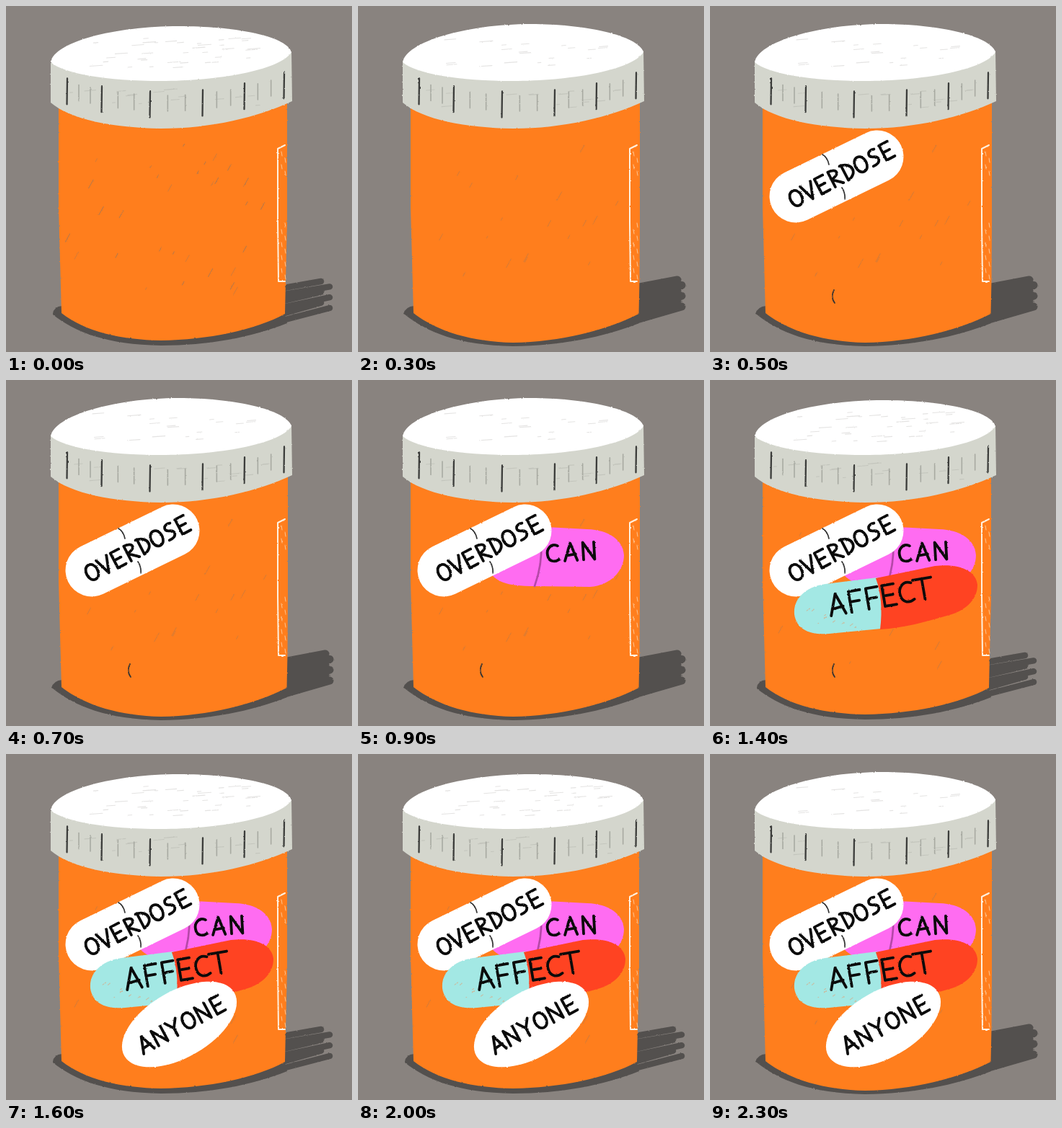
An HTML page for the animation above (2400 ms loop, 480 by 480 pixels).

```html
<!DOCTYPE html>
<html lang="en">
<head>
<meta charset="utf-8">
<title>Overdose can affect anyone</title>
<style>
html, body { margin: 0; width: 100%; height: 100%; overflow: hidden; background: #89837f; }
svg { display: block; width: 100vw; height: 100vh; }
path { stroke-linecap: round; stroke-linejoin: round; }
</style>
</head>
<body>
<svg viewBox="0 0 480 480" role="img" aria-label="Overdose can affect anyone">
  <defs id="defs"></defs>
  <g id="jars"></g>
  <g id="pills" filter="url(#chalk2)"></g>
</svg>
<script>
const $ = id => document.getElementById(id);

function random(seed) {
  return () => (seed = seed * 16807 % 2147483647) / 2147483647;
}

const line = (d, color, width, opacity = 1) =>
  `<path d="${d}" fill="none" stroke="${color}" stroke-width="${width}" opacity="${opacity}"/>`;
const shape = (d, color) => `<path d="${d}" fill="${color}"/>`;

// short parallel strokes (dx, dy) scattered over a box
function specks(rnd, count, [x, y, w, h], [dx, dy], color, opacity) {
  let d = '';
  for (let i = 0; i < count; i++) {
    const size = .3 + rnd();
    d += `M${x + rnd() * w} ${y + rnd() * h}l${dx * size} ${dy * size}`;
  }
  return line(d, color, 1.1, opacity);
}

// hand lettering: strokes around the middle of a box ten units high
const glyphs = {
  A: 'M-3.6 5L0 -5L3.6 5M-2.6 2L2.8 1.4',
  C: 'M3 -4C-1 -6 -3.5 -2 -3 1C-2.6 5 1 5.5 3.4 4',
  D: 'M-2.2 -5V5C5 4 5 -4 -3.2 -5',
  E: 'M3 -5H-2.6V5H3M-2.6 0H2',
  F: 'M3.5 -5H-2V5M-2 0H2.5',
  N: 'M-3.2 5V-5L3.2 5V-5',
  O: 'M0 -4.8C-4.7 -4.8 -4.7 4.8 0 4.8S4.7 -4.8 0 -4.8Z',
  R: 'M-2.3 5V-5C4 -5 4 -.5 -2.3 0L3.3 5',
  S: 'M2.5 -4.5C-1 -6 -4 -2 0 -.5S2.5 5 -2.5 4.5',
  T: 'M-4.4 -5H4.4M0 -5V5',
  V: 'M-3.5 -5L0 5L3.5 -5',
  Y: 'M-3.5 -5L0 0L3.5 -5M0 0V5'
};

// evenly spaced letters from the middle of the first to the middle of the last
function word(text, [x1, y1], [x2, y2], height) {
  const dx = x2 - x1, dy = y2 - y1, scale = height / 10;
  const pitch = Math.hypot(dx, dy) / (text.length - 1) / scale;
  const letters = [...text].map((c, i) =>
    `<g transform="translate(${i * pitch})">${line(glyphs[c], '#0b0b0b', 3.8 / scale)}</g>`);
  return `<g transform="translate(${x1} ${y1}) rotate(${Math.atan2(dy, dx) * 180 / Math.PI}) scale(${scale})">${letters.join('')}</g>`;
}

// x of the dark lid ridges; two pale ones stand evenly between each pair
const ridgeX = [85, 133, 200, 273, 331, 386];

function ridge(x, dark) {
  const y = 119 - 27 * ((x - 222) / 165) ** 2;
  return dark ? line(`M${x} ${y}l-.5 36`, '#3c3d3b', 2.3) : line(`M${x} ${y + 5}v22`, '#a8aaa2', 1.6);
}

function ridges() {
  return ridgeX.map((x, i) => {
    const gap = (ridgeX[i + 1] - x) / 3;
    return ridge(x, true) + (gap ? ridge(x + gap) + ridge(x + 2 * gap) : '');
  }).join('');
}

function label() {
  let ticks = '';
  for (let y = 202; y < 378; y += 9) {
    if (y < 235 || y > 300) ticks += `M${y % 2 ? 387 : 382} ${y}l1 6`;
  }
  return line('M387 193L377 198V300L378 382H387', '#fff1df', 2) + line(ticks, '#ffd0a0', 1.1, .8);
}

// scribbled shadow with ragged tips
function shadow(k) {
  let d = '';
  for (let i = 0; i < 6; i++) {
    const tip = 437 + k * 6 + i % 2 * (12 - k * 6);
    d += `M380 ${392 + i * 9}L${tip} ${382 + i * 7.4 - k * 2}`;
  }
  return line(d, '#53504e', 8.5 + k * 2.5);
}

function jar(k) {
  const rnd = random(41 + k * 30), bottom = 465 + k * 3, right = 387 + k * 2.5, top = 28 - k * 3;
  const body = [85, 180, 280, 215], slant = [-5, 9], scuff = '#94765d';
  return `<g filter="url(#chalk${k})">` +
    shadow(k) +
    shape(`M${65 - k * 2} 427Q66 417 78 416L386 425L390 440C340 460 280 471 215 ${471 + k}C140 ${470 + k} 95 452 65 428Z`, '#53504e') +
    shape(`M73 130V280L77 426C110 452 160 ${bottom - 2} 215 ${bottom - 1}C280 ${bottom - 2} 345 450 ${right} 427L${right + 1} 380L${390 + k} 300V125Z`, '#ff7e1d') +
    specks(rnd, 10 + k * 8, body, slant, scuff, .35) +
    (k ? '' : `<g id="bare">${specks(rnd, 20, body, slant, scuff, .6)}</g>`) +
    label() +
    shape('M62 76V134C90 158 150 169 215 170C285 170 350 154 397 132L396 62Z', '#d4d6cd') +
    specks(rnd, 16, [80, 115, 285, 28], [12, -1], '#b9bbb3', .6) +
    ridges() +
    shape(`M62 78C66 50 150 ${top} 240 ${top}C312 ${top} 388 40 396 64C380 90 290 104 215 104C140 104 80 94 62 78Z`, '#fff') +
    specks(rnd, 36 - k * 16, [115, 44, 225, 42], [14, -1], '#c4c2be', .45) + '</g>';
}

// drawn in this order, so that CAN lies beneath OVERDOSE
const pills = [
  { at: 2, art:
    shape('M180 262C190 280 205 286 245 286L322 287C350 285 369 265 369 243C368 222 348 208 318 207L262 204L200 230Z', '#ff6cf1') +
    line('M254 226Q256 255 245 286', '#b548a8', 2.6) +
    word('CAN', [270, 240], [320, 237], 24) },
  { at: 1, art:
    line('M119 264L232 209', '#fff', 73) +
    line('M156 206Q163 210 165 220M183 252Q188 260 187 268M172 394Q167 404 173 412', '#333', 1.7) +
    word('OVERDOSE', [119.5, 266.5], [245, 201], 23) },
  { at: 3, art:
    shape('M232 274L160 283C132 287 115 304 117 325C120 346 138 354 165 352L237 345Q243 305 232 274Z', '#a3e8e4') +
    shape('M230 275L312 258C345 254 369 264 371 284C371 305 355 321 325 328C300 335 270 344 236 346Q241 305 230 275Z', '#ff4322') +
    specks(random(9), 9, [135, 315, 85, 28], [-4, 3], '#d9a884', .7) +
    word('AFFECT', [176, 311], [296, 290], 29) },
  { at: 4, art:
    '<ellipse fill="#fff" cx="240.5" cy="375" rx="88" ry="46" transform="rotate(-30 240.5 375)"/>' +
    word('ANYONE', [193, 402], [293, 348], 23) }
];

$('defs').innerHTML = [3, 8, 5].map((seed, i) => `
  <filter id="chalk${i}" x="0" y="0" width="480" height="480" filterUnits="userSpaceOnUse" color-interpolation-filters="sRGB">
    <feTurbulence type="fractalNoise" baseFrequency=".35" numOctaves="2" seed="${seed}"/>
    <feDisplacementMap in="SourceGraphic" scale="2" xChannelSelector="R" yChannelSelector="G"/>
  </filter>`).join('');
$('jars').innerHTML = jar(0) + jar(1);
$('pills').innerHTML = pills.map(p => `<g>${p.art}</g>`).join('');

const show = (el, on) => { el.style.display = on ? '' : 'none'; };

let last = -1;
function draw() {
  const step = Math.floor(performance.now() % 2400 / 100);
  if (step !== last) {
    last = step;
    const words = Math.floor(step / 4);
    [...$('jars').children].forEach((el, i) => show(el, i === step % 2));
    [...$('pills').children].forEach((el, i) => show(el, words >= pills[i].at));
    show($('bare'), words === 0);
  }
  requestAnimationFrame(draw);
}
draw();
</script>
</body>
</html>
```
